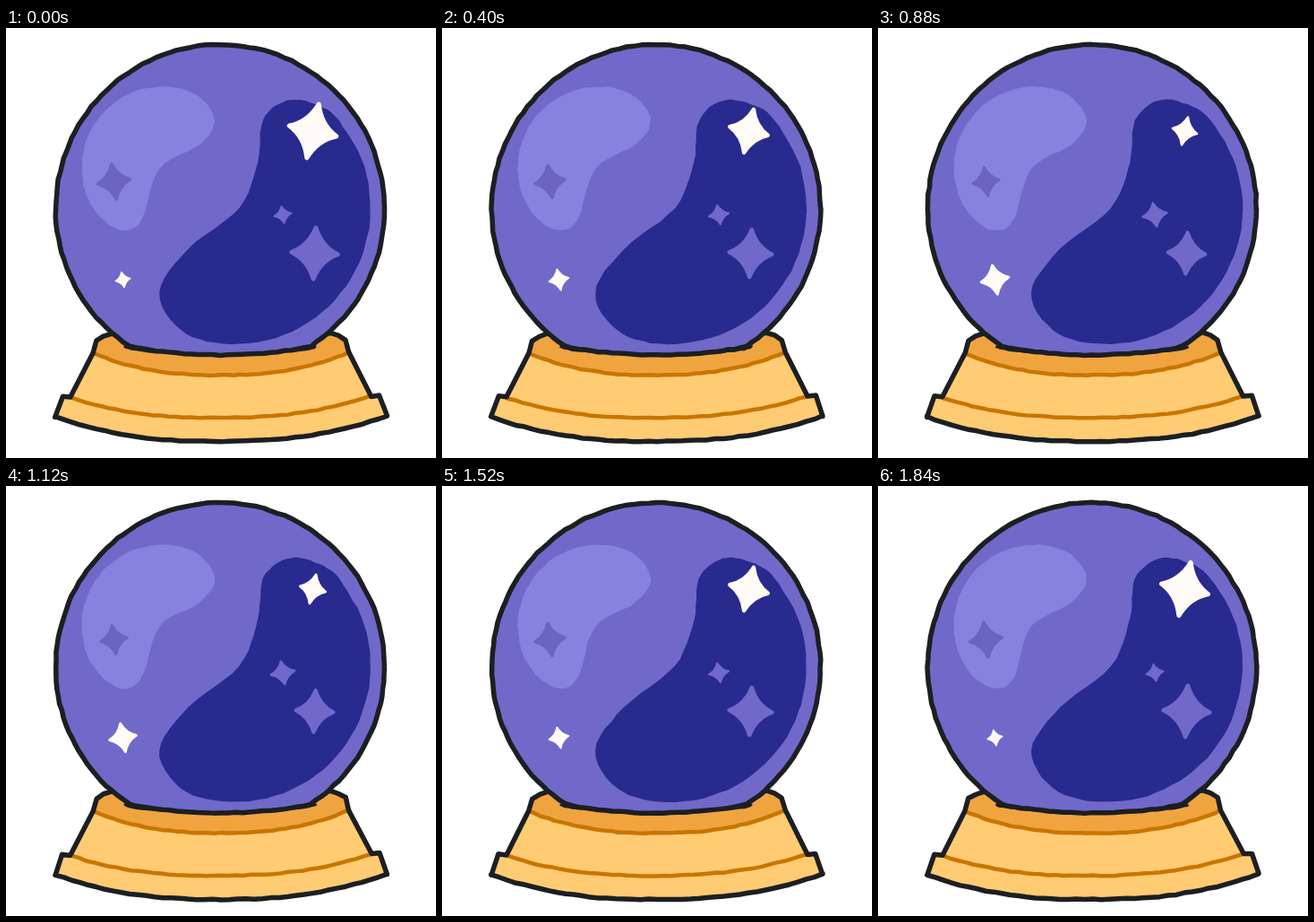
Animation, 480 px wide and 480 px high, one loop 1.92 s. Source, as an HTML page with a canvas:

```html
<!DOCTYPE html>
<html lang="en">
<head>
<meta charset="utf-8">
<title>Crystal ball</title>
<style>
html, body { margin: 0; width: 100%; height: 100%; overflow: hidden; background: #fff; }
canvas { display: block; width: 480px; height: 480px; }
</style>
</head>
<body>
<canvas id="stage" width="480" height="480"></canvas>
<script>
const ctx = document.getElementById('stage').getContext('2d');
const LOOP = 1920, STEP = 80;
const INK = '#1c1f22', VIOLET = '#7069c9', LILAC = '#8682df', NAVY = '#292a8e',
  WHITE = '#fffaf5', GOLD = '#ffcb73', AMBER = '#f0a43f', RUST = '#c97500';

// Points on an elliptical arc, angles in degrees
function arc(x, y, rx, ry, from, to, count) {
  return Array.from({ length: count + 1 }, (_, i) => {
    const a = (from + (to - from) * i / count) * Math.PI / 180;
    return [x + rx * Math.cos(a), y + ry * Math.sin(a)];
  });
}

// A line from a to b that hangs down in the middle
function hang([ax, ay], [bx, by], depth) {
  return Array.from({ length: 41 }, (_, i) => {
    const t = i / 40;
    return [ax + (bx - ax) * t, ay + (by - ay) * t + depth * (1 - Math.abs(2 * t - 1) ** 2.4)];
  });
}

// Closed Catmull-Rom curve through the given points
function blob(pts) {
  const n = pts.length;
  return pts.flatMap((b, i) => {
    const a = pts[(i + n - 1) % n], c = pts[(i + 1) % n], d = pts[(i + 2) % n];
    return Array.from({ length: 6 }, (_, k) => {
      const t = k / 6;
      return [0, 1].map(j => b[j] + t / 2 * (c[j] - a[j]
        + t * (2 * a[j] - 5 * b[j] + 4 * c[j] - d[j] + t * (3 * (b[j] - c[j]) + d[j] - a[j]))));
    });
  });
}

const mirror = pts => pts.map(([x, y]) => [480 - x, y - 1]).reverse();

const noise = n => {
  const s = Math.sin(n * 12.9898) * 43758.5453;
  return s - Math.floor(s) - 0.5;
};

const rimSide = [[118, 341], [109, 344], [101, 349], [97, 363]];
const baseSide = [...rimSide, [72, 412], [63, 411], [55, 434]];
const rimEdge = hang([97, 363], [383, 362], 25);
const flangeEdge = hang([73, 413], [407, 411], 23);
const base = [...baseSide, ...hang([55, 434], [425, 433], 28), ...mirror(baseSide)];
const rim = [...rimSide, ...rimEdge, ...mirror(rimSide)];
const shadow = arc(239, 356, 108, 9, 0, 360, 60);
// A circle resting on a nearly flat bottom
const ball = arc(239, 202, 183.5, 183.5, 0, 360, 140)
  .map(([x, y]) => [x, Math.min(y, 365 - 9 * ((x - 239) / 100) ** 2)]);
const shine = blob([...arc(175, 156, 90.5, 90.5, 160, 276, 5),
  [216, 77], [233, 104], [216, 130], [171, 157], [152, 213], [132, 226], [108, 214]]);
const shade = blob([...arc(255, 201, 152, 152, -40, 95, 6),
  [195, 337], [171, 295], [203, 247], [260, 201], [281, 150], [287, 103], [313, 81], [345, 85]]);

// x, y, half height at the loop's start and middle, width ratio, tilt, colour
const stars = [
  [342.5, 115, 33, 16.8, 0.88, 0.22, WHITE],
  [130.5, 281, 9.5, 18, 0.95, -0.18, WHITE],
  [344.5, 251.5, 31, 25, 0.9, 0.05, VIOLET],
  [309, 208.5, 10.5, 14.5, 1.03, -0.17, VIOLET],
  [120.5, 171.5, 21.5, 17.5, 0.92, -0.14, '#6b64c3']
];

function draw(pts, seed, { fill, line, width = 5.5, open = false }) {
  ctx.beginPath();
  pts.forEach(([x, y], i) => {
    const k = seed * 311 + i * 2;
    ctx.lineTo(x + noise(k), y + noise(k + 1));
  });
  if (!open) ctx.closePath();
  if (fill) { ctx.fillStyle = fill; ctx.fill(); }
  if (line) { ctx.strokeStyle = line; ctx.lineWidth = width; ctx.stroke(); }
}

function drawStar([x, y, start, middle, ratio, tilt, color], swing) {
  const size = middle + (start - middle) * swing;
  const edge = size * 0.16, h = size - edge / 2, w = h * ratio;
  ctx.save();
  ctx.translate(x, y);
  ctx.rotate(tilt);
  ctx.beginPath();
  ctx.moveTo(0, -h);
  for (const [cx, cy, px, py] of [[1, -1, w, 0], [1, 1, 0, h], [-1, 1, -w, 0], [-1, -1, 0, -h]])
    ctx.quadraticCurveTo(cx * w * 0.28, cy * h * 0.28, px, py);
  ctx.closePath();
  ctx.fillStyle = ctx.strokeStyle = color;
  ctx.lineWidth = edge;
  ctx.fill();
  ctx.stroke();
  ctx.restore();
}

function render(now) {
  const pose = Math.floor(now % LOOP / STEP);
  const swing = (1 + Math.cos(pose * STEP / LOOP * Math.PI * 2)) / 2;
  const seed = pose * 10;
  ctx.fillStyle = '#fff';
  ctx.fillRect(0, 0, 480, 480);
  ctx.lineJoin = ctx.lineCap = 'round';

  draw(base, seed, { fill: GOLD });
  draw(rim, seed + 1, { fill: AMBER });
  draw(rimEdge, seed + 2, { line: RUST, width: 4.5, open: true });
  draw(flangeEdge, seed + 3, { line: RUST, width: 4.5, open: true });
  draw(base, seed, { line: INK });
  draw(shadow, seed + 4, { fill: INK });
  draw(ball, seed + 5, { fill: VIOLET, line: INK });
  draw(shine, seed + 6, { fill: LILAC });
  draw(shade, seed + 7, { fill: NAVY });
  stars.forEach(star => drawStar(star, swing));
}

const begin = performance.now();
function tick() {
  render(performance.now() - begin);
  requestAnimationFrame(tick);
}
tick();
</script>
</body>
</html>
```
